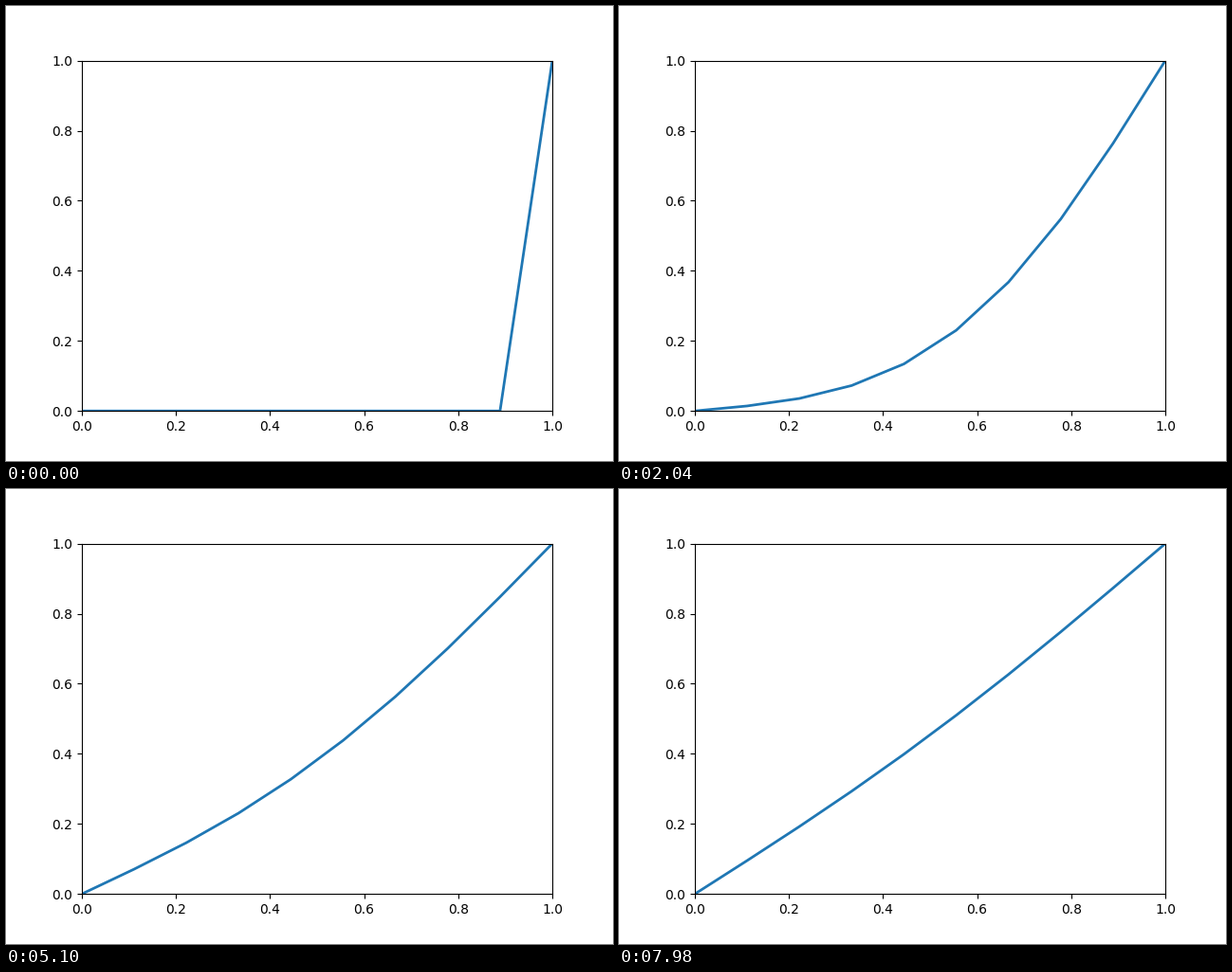
These frames come from a looping animation (640x480 px, 8 s). A matplotlib script:

```python
import numpy as np
import matplotlib.pyplot as plt
from matplotlib.animation import FuncAnimation

NODES = 10
DT = 0.001
STEP_MS = 30
TICK_MS = 20
LOOP_MS = 8000

x = np.linspace(0, 1, NODES)
r = DT / (x[1] - x[0]) ** 2


def diffuse(steps):
    """Explicit heat equation with ends held at 0 and 1."""
    u = np.zeros(NODES)
    u[-1] = 1
    history = [u]
    for _ in range(steps):
        u = u.copy()
        u[1:-1] += r * np.diff(u, 2)
        history.append(u)
    return history


history = diffuse(LOOP_MS // STEP_MS)

fig = plt.figure(figsize=(6.4, 4.8), dpi=100)
ax = plt.axes(xlim=(0, 1), ylim=(0, 1))
line, = ax.plot(x, history[0], lw=2)


def update(i):
    step = (i * TICK_MS + TICK_MS // 2) // STEP_MS
    line.set_ydata(history[step])
    return line,


anim = FuncAnimation(fig, update, frames=LOOP_MS // TICK_MS,
                     interval=TICK_MS, repeat=True, repeat_delay=0)
plt.show()
```
